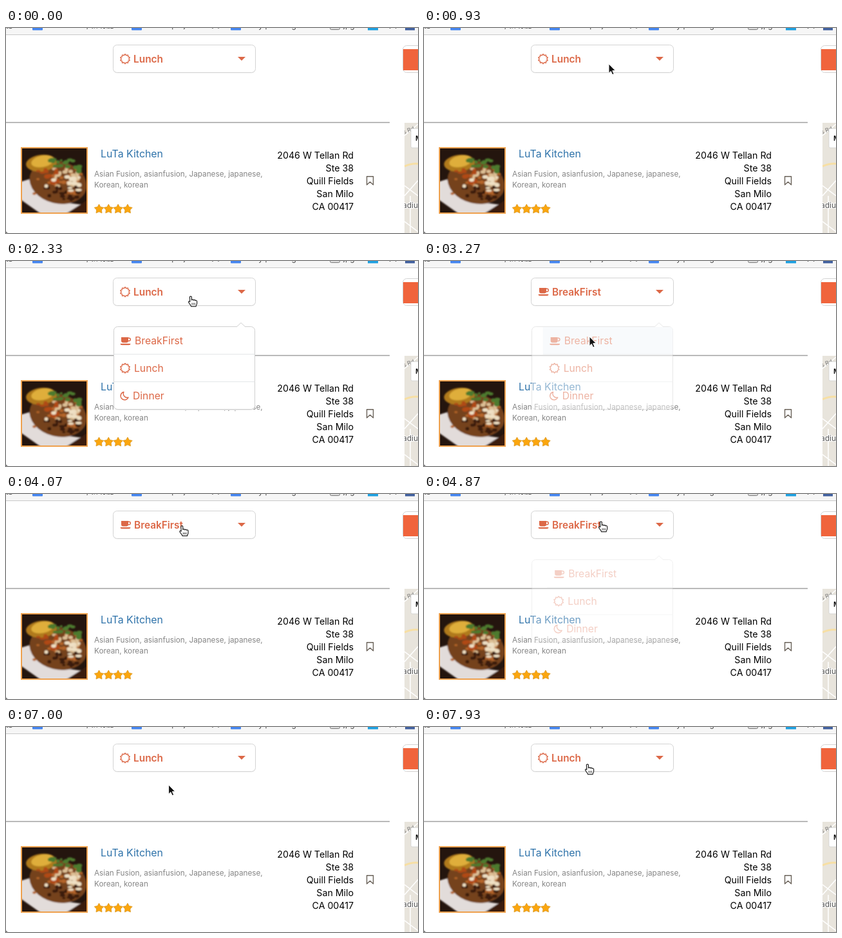
An HTML page that plays this animation: 640x320 px, repeating every 8000 ms.

```html
<!DOCTYPE html>
<html lang="en">
<head>
<meta charset="utf-8">
<title>Meal dropdown</title>
<style>
  html, body { margin: 0; width: 100%; height: 100%; overflow: hidden; background: #fff; }
  svg { display: block; width: 640px; height: 320px; font-family: Inter, "Noto Sans CJK SC", sans-serif; }
  .accent { fill: #dc6847; }
  .line { fill: none; stroke: #dc6847; stroke-width: 1.4; stroke-linejoin: round; }
  .label { font-size: 15.4px; font-weight: 600; }
  .item { font-size: 15.7px; }
  .tags { font-size: 11.75px; fill: #858585; }
  .address { font-size: 14.2px; text-anchor: end; }
  .bookmarks { font-size: 12px; fill: #444; }
</style>
</head>
<body>
<svg viewBox="0 0 640 320">
  <defs>
    <g id="coffee">
      <path class="accent" d="M-7-6H4v5.6a3 3 0 0 1-3 3h-5a3 3 0 0 1-3-3zM-8.5 4H7.5a2.6 2.2 0 0 1-2.6 2.2H-5.9a2.6 2.2 0 0 1-2.6-2.2z"/>
      <path class="line" d="M4-4.8h1a2.3 2.3 0 0 1 0 4.6H4"/>
    </g>
    <path id="sun" class="line"/>
    <path id="moon" class="line" d="M-1-6A6.2 6.2 0 1 0 6 2.5A6 6 0 0 1-1-6z"/>
    <path id="star" fill="#fba60e" stroke="#dd9a24" stroke-width=".9" stroke-linejoin="round"/>
    <clipPath id="menuClip"><rect x="167.5" y="102.5" width="219" height="129" rx="6"/></clipPath>
    <clipPath id="photoClip"><rect x="25" y="188" width="100" height="100"/></clipPath>
    <clipPath id="mapClip"><rect x="619" y="148" width="21" height="172"/></clipPath>
    <filter id="soft"><feGaussianBlur stdDeviation="1"/></filter>
  </defs>

  <!-- browser bar -->
  <rect width="640" height="10" fill="#f6f6f6"/>
  <path d="M0 10.5H640" stroke="#c9c9c9"/>
  <g class="bookmarks">
    <text x="-14" y="0">功能</text>
    <text x="62" y="0">Draft notes, 新功能</text>
    <text x="217" y="0">Draft - project list 文</text>
    <text x="371" y="0">Daily planning</text>
    <text x="524" y="0">jpg</text>
    <text x="583" y="0">工具</text>
  </g>
  <g fill="#4384f0">
    <rect x="41" y="-12" width="16" height="15.5" rx="1"/>
    <rect x="195" y="-12" width="16" height="15.5" rx="1"/>
    <rect x="349" y="-12" width="16" height="15.5" rx="1"/>
    <rect x="562" y="-12" width="16" height="15.5" fill="#1c9fe0"/>
    <rect x="620" y="-12" width="15" height="15.5" fill="#405f9e"/>
  </g>
  <rect x="503.5" y="-10" width="15" height="12.5" rx="2" fill="#ddd" stroke="#777"/>

  <!-- header -->
  <rect x="166.5" y="27.5" width="221" height="43" rx="6" fill="#eee"/>
  <rect x="166.5" y="26.5" width="221" height="43" rx="6" fill="#fff" stroke="#d3d3d3"/>
  <path class="accent" d="M360 45h12l-6 6z"/>
  <g id="lunchLabel" class="accent label"><use href="#sun" x="185" y="48.3"/><text x="198" y="54.3">Lunch</text></g>
  <g id="breakLabel" class="accent label"><use href="#coffee" x="186" y="48"/><text x="199" y="54.3">BreakFirst</text></g>
  <rect x="616.5" y="27.5" width="40" height="42" rx="6" fill="#fff" stroke="#d3d3d3"/>
  <rect x="617" y="33" width="33" height="33" fill="#f0643c"/>
  <path d="M0 147.5H596" stroke="#a0a0a0" stroke-width="1.3"/>

  <!-- listing -->
  <g clip-path="url(#photoClip)">
    <rect x="23" y="186" width="104" height="104" fill="#24150e"/>
    <g filter="url(#soft)">
      <path d="M23 240L36 236Q44 272 127 276L110 290H54L23 268z" fill="#e2dcda"/>
      <path d="M90 292L127 268V292z" fill="#3a1a10"/>
      <ellipse cx="81" cy="241" rx="45" ry="33" fill="#75421d" transform="rotate(14 81 241)"/>
      <ellipse cx="55" cy="211" rx="24" ry="13" fill="#b07a1c" transform="rotate(-6 55 211)"/>
      <ellipse cx="57" cy="208" rx="18" ry="9" fill="#dfae3a" transform="rotate(-12 57 208)"/>
      <g id="toppings"></g>
    </g>
  </g>
  <rect x="24" y="187" width="102" height="102" fill="none" stroke="#eea04d" stroke-width="2"/>
  <text x="147" y="202.3" font-size="15.9" fill="#2f73aa">LuTa Kitchen</text>
  <text class="tags" x="137" y="232.4">Asian Fusion, asianfusion, Japanese, japanese,</text>
  <text class="tags" x="137" y="249.2">Korean, korean</text>
  <use href="#star" x="144.5" y="282.7"/><use href="#star" x="159.3" y="282.7"/>
  <use href="#star" x="174.1" y="282.7"/><use href="#star" x="188.9" y="282.7"/>
  <g class="address">
    <text x="540" y="203.5">2046 W Tellan Rd</text>
    <text x="540" y="223.5">Ste 38</text>
    <text x="540" y="243.5">Quill Fields</text>
    <text x="540" y="263.5">San Milo</text>
    <text x="540" y="283.5">CA 00417</text>
  </g>
  <path d="M560.5 231.7h10v13l-5-4.4-5 4.4z" fill="none" stroke="#6a6259" stroke-width="1.4" stroke-linejoin="round"/>

  <!-- map edge -->
  <g clip-path="url(#mapClip)">
    <rect x="619" y="148" width="21" height="172" fill="#e8e4dc"/>
    <path d="M619 168L640 150M619 262L640 238M619 246L640 262M619 302L640 318M628 262V320" fill="none" stroke="#fff" stroke-width="1.5"/>
    <path d="M619 216Q630 211 640 212" fill="none" stroke="#f7dfa4" stroke-width="3"/>
    <text transform="translate(618 166) rotate(-22)" font-size="9" fill="#777">s Rd</text>
    <rect x="629" y="157" width="20" height="30" rx="2" fill="#fff" stroke="#ccc" stroke-width=".7"/>
    <text x="636" y="176" font-size="11" font-weight="600">M</text>
    <text x="616" y="281" font-size="12" fill="#555" stroke="#fff" stroke-width="2" paint-order="stroke">adiu</text>
  </g>
  <path d="M0 316Q0 320 4 320H0z" fill="#555"/>

  <!-- menu -->
  <g id="menu">
    <rect x="167.5" y="103.5" width="219" height="129" rx="6" fill="none" stroke="#e8e8e8"/>
    <rect x="167.5" y="102.5" width="219" height="129" rx="6" fill="#fff" stroke="#d0d0d0"/>
    <path d="M358 103l7-6.5 7 6.5" fill="#fff" stroke="#d0d0d0"/>
    <g clip-path="url(#menuClip)">
      <g id="items" class="accent item">
        <rect id="hover" x="167" width="220" height="42" fill="#f2f6f9"/>
        <path d="M167 145.5H387M167 188.5H387" stroke="#e3e6e8"/>
        <use href="#coffee" x="186" y="125"/><text x="200" y="130.2">BreakFirst</text>
        <use href="#sun" x="185" y="167.3"/><text x="199" y="173.2">Lunch</text>
        <use href="#moon" x="184" y="210.5"/><text x="197" y="216.2">Dinner</text>
      </g>
    </g>
  </g>

  <g id="cursor" stroke-linejoin="round">
    <path id="arrow" d="M0 0v14.5l3.3-3 2.4 5.3 2.4-1-2.3-5.2h4.5z" fill="#111" stroke="#fff"/>
    <g id="hand" fill="#fff" stroke="#222" stroke-width="1.2">
      <path d="M-1.6 .6a1.5 1.5 0 0 1 3 0v4.4c.4-1.2 2.7-1 2.8.3.5-1 2.6-.8 2.8.6.6-.8 2.6-.5 2.6 1v3.2c0 2-1.4 2.4-1.4 4.7H.6c-.3-2-2.4-3.4-3.8-6-1-1.8 1-2.6 2-1.2z"/>
      <path d="M2 9.5v3M4.2 9.5v3M6.4 9.5v3" stroke-width=".9"/>
    </g>
  </g>
</svg>
<script>
const LOOP = 8000, FADE = 300, SLIDE = 35;
const cursorKeys = [
  [400, 300, 335], [900, 287, 56], [2400, 287, 56], [2900, 257, 118], [3500, 257, 118],
  [4200, 275, 44], [4950, 275, 44], [5600, 249, 169], [6450, 249, 169], [7300, 254, 59], [LOOP, 254, 59]
];
const visits = [{ open: 1250, close: 3120 }, { open: 4760, close: 6122 }];

const el = id => document.getElementById(id);
const show = (id, visible) => el(id).setAttribute("visibility", visible ? "visible" : "hidden");
const ease = x => { x = Math.min(1, Math.max(0, x)); return x * x * (3 - 2 * x); };

function starPath(points, outer, inner) {
  let path = "";
  for (let i = 0; i < points * 2; i++) {
    const radius = i % 2 ? inner : outer, angle = Math.PI * (i / points - .5);
    path += (i ? "L" : "M") + (radius * Math.cos(angle)).toFixed(2) + " " + (radius * Math.sin(angle)).toFixed(2);
  }
  return path + "z";
}

function scatterToppings() {
  let seed = 7;
  const random = () => (seed = seed * 16807 % 2147483647) / 2147483647;
  // color, center, spread, count
  const patches = [
    ["#b5652a", 80, 240, 36, 22, 26], ["#ddc096", 94, 234, 22, 14, 20],
    ["#3a1a0d", 84, 258, 28, 10, 22], ["#b04a18", 66, 232, 16, 12, 14],
    ["#efe0c4", 88, 244, 28, 12, 14], ["#4d7a2e", 86, 211, 18, 6, 16],
    ["#4d7a2e", 108, 220, 8, 6, 6]
  ];
  let shapes = "";
  for (const [color, x, y, spreadX, spreadY, count] of patches)
    for (let i = 0; i < count; i++) {
      const cx = x + (random() * 2 - 1) * spreadX, cy = y + (random() * 2 - 1) * spreadY;
      shapes += `<ellipse cx="${cx}" cy="${cy}" rx="${2 + random() * 3}" ry="${1.5 + random() * 2}" fill="${color}"/>`;
    }
  el("toppings").innerHTML = shapes;
}

function cursorAt(t) {
  const next = cursorKeys.findIndex(key => key[0] > t);
  if (next < 1) return null;
  const [t0, x0, y0] = cursorKeys[next - 1], [t1, x1, y1] = cursorKeys[next];
  const k = ease((t - t0) / (t1 - t0));
  return { x: x0 + (x1 - x0) * k, y: y0 + (y1 - y0) * k };
}

function draw(t) {
  const openness = visits.reduce((sum, v) => sum + ease((t - v.open) / FADE) - ease((t - v.close) / FADE), 0);
  const isOpen = visits.some(v => t >= v.open && t < v.close);
  el("menu").setAttribute("opacity", openness);
  el("items").setAttribute("transform", `translate(${SLIDE * (1 - openness)} 0)`);

  const breakfast = t >= visits[0].close && t < visits[1].close;
  el("breakLabel").setAttribute("display", breakfast ? "inline" : "none");
  el("lunchLabel").setAttribute("display", breakfast ? "none" : "inline");

  const point = cursorAt(t);
  const row = point ? Math.floor((point.y - 102) / 43) : -1;
  const overMenu = openness > 0 && row >= 0 && row < 3;
  el("hover").setAttribute("y", 103 + 43 * row);
  show("hover", overMenu);

  const overHeader = point && point.y > 26 && point.y < 70 && t > 1000;
  const pointing = overHeader || (overMenu && isOpen);
  show("hand", point && pointing);
  show("arrow", point && !pointing);
  if (point) el("cursor").setAttribute("transform", `translate(${point.x} ${point.y})`);
}

el("sun").setAttribute("d", starPath(10, 7.6, 5.8));
el("star").setAttribute("d", starPath(5, 7.6, 4.1));
scatterToppings();

const start = performance.now();
function tick() {
  draw((performance.now() - start) % LOOP);
  requestAnimationFrame(tick);
}
tick();
</script>
</body>
</html>
```
